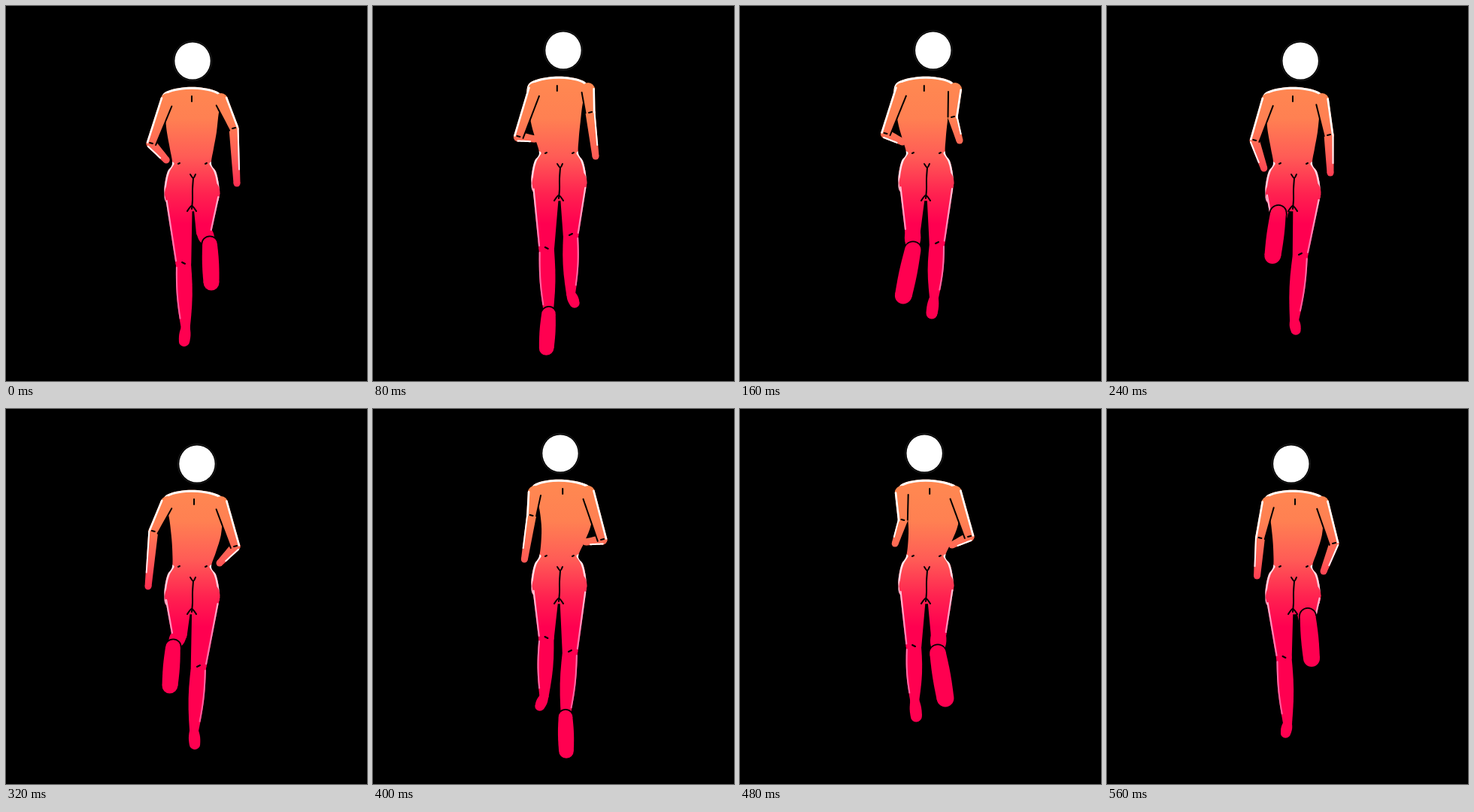
Recreate the animation shown at these times as an HTML page with a canvas. Size 480 px wide and 499 px high, loop 600 ms.

```html
<!DOCTYPE html>
<html lang="en">
<head>
<meta charset="utf-8">
<title>Run cycle</title>
<style>
  html, body { margin: 0; width: 100%; height: 100%; overflow: hidden; background: #000; }
  canvas { display: block; width: 480px; height: 499px; }
</style>
</head>
<body>
<canvas id="stage" width="480" height="499"></canvas>
<script>
const ctx = document.getElementById('stage').getContext('2d');
const STEP = 80, LOOP = 600, POSES = 8;
const CENTER = 247;

// Right-hand limbs through one stride; the left ones run half a stride later, mirrored.
const stride = [
  { elbow: [303, 163], hand: [307, 236], knee: [263, 300], ankle: [271, 317], toe: [273, 368] },
  { elbow: [289, 142], hand: [296, 200], knee: [263, 305], ankle: [263, 383], toe: [268, 395] },
  { elbow: [283, 148], hand: [292, 179], knee: [262, 316], ankle: [258, 388], toe: [255, 409] },
  { elbow: [295, 172], hand: [297, 222], knee: [257, 331], ankle: [249, 418], toe: [251, 431] },
  { elbow: [305, 183], hand: [284, 205], knee: [256, 343], ankle: [250, 428], toe: [251, 446] },
  { elbow: [305, 174], hand: [283, 177], knee: [262, 323], ankle: [256, 410], toe: [257, 455] },
  { elbow: [305, 170], hand: [282, 181], knee: [264, 300], ankle: [263, 325], toe: [273, 385] },
  { elbow: [302, 179], hand: [288, 216], knee: [266, 285], ankle: [267, 276], toe: [272, 332] }
];

// Torso half: [distance below the neckline, half width]
const torsoProfile = [
  [0, 8], [3, 26], [9, 38], [20, 40], [34, 36], [60, 33], [82, 29], [102, 26],
  [112, 32], [126, 35.5], [140, 36.5], [154, 33], [164, 10]
];

function verticalGradient(...stops) {
  const gradient = ctx.createLinearGradient(0, 0, 0, 499);
  for (const [y, color] of stops) gradient.addColorStop(y / 499, color);
  return gradient;
}
const skin = verticalGradient([100, '#ff8851'], [150, '#ff8052'], [200, '#ff5c56'], [250, '#ff2250'], [290, '#ff0050']);
const light = verticalGradient([185, '#fff'], [245, '#ffc0d4'], [310, '#ff78ae'], [470, '#ff4c92']);

const mix = (a, b, t) => a + (b - a) * t;
const range = (from, to, count) => Array.from({ length: count + 1 }, (_, i) => mix(from, to, i / count));
const wave = (turns) => Math.cos(turns * Math.PI * 2);

// Catmull-Rom spline as cubic Béziers
function spline(points, closed = false) {
  const n = points.length;
  const at = i => closed ? points[(i + n) % n] : points[Math.max(0, Math.min(n - 1, i))];
  const path = new Path2D();
  path.moveTo(...points[0]);
  for (let i = 0; i < (closed ? n : n - 1); i++) {
    const [a, b, c, d] = [at(i - 1), at(i), at(i + 1), at(i + 2)];
    path.bezierCurveTo(
      b[0] + (c[0] - a[0]) / 6, b[1] + (c[1] - a[1]) / 6,
      c[0] - (d[0] - b[0]) / 6, c[1] - (d[1] - b[1]) / 6, c[0], c[1]);
  }
  return path;
}

function stroke(path, color, width) {
  ctx.strokeStyle = color;
  ctx.lineWidth = width;
  ctx.stroke(path);
}
const ink = (...points) => stroke(spline(points), '#000', 2);

function fillSkin(path) {
  ctx.fillStyle = skin;
  ctx.fill(path);
}

// A tapered segment from a to b with round ends; its outer side is the right when it points down.
function bone(a, b, startWidth, endWidth, bulge = 0) {
  const [dx, dy] = [b[0] - a[0], b[1] - a[1]];
  const length = Math.hypot(dx, dy);
  const edge = (side, from, to, inset = 0) => range(from, to, 6).map(t => {
    const offset = side * (mix(startWidth, endWidth, t) + bulge * Math.sin(Math.PI * t) - inset) / length;
    return [a[0] + dx * t + dy * offset, a[1] + dy * t - dx * offset];
  });
  const disc = ([x, y], radius) => {
    const path = new Path2D();
    path.arc(x, y, radius, 0, Math.PI * 2);
    return path;
  };
  const body = new Path2D();
  [...edge(1, 0, 1), ...edge(-1, 1, 0)].forEach(point => body.lineTo(...point));
  body.closePath();
  const shapes = [disc(a, startWidth), body, disc(b, endWidth)];
  return {
    length,
    fill: () => shapes.forEach(fillSkin),
    outline: () => shapes.forEach(shape => stroke(shape, '#000', 3.4)),
    lightEdge: (from, to, width) => stroke(spline(edge(1, from, to, width / 2)), light, width),
    innerLine: (from, to) => stroke(spline(edge(-1, from, to)), '#000', 2)
  };
}

function drawArm({ elbow, hand }, top) {
  const upper = bone([286, top + 17], elbow, 9, 6.5);
  const fore = bone(elbow, hand, 6.5, 4.5);
  upper.fill();
  fore.fill();
  upper.lightEdge(0, 1, 2.6);
  fore.lightEdge(0, 0.75, 2);
  upper.innerLine(0.1, 1);
  ink([elbow[0] - 2, elbow[1]], [elbow[0] + 2, elbow[1] - 1]);
}

function drawLeg({ knee, ankle, toe }, top) {
  const thigh = bone([266, top + 140], knee, 18.5, 10.3);
  const shin = bone(knee, ankle, 10, 6, 2.4);
  const footLength = Math.hypot(toe[0] - ankle[0], toe[1] - ankle[1]);
  const footWidth = 6 + footLength * 0.11;
  const soleShown = footLength > 40;
  const foot = bone(ankle, toe, soleShown ? footWidth * 0.85 : 6, footWidth * 0.9, 1);

  thigh.fill();
  shin.fill();
  thigh.lightEdge(0.1, 0.95, 2.2);
  if (shin.length > 40) {
    shin.lightEdge(0.05, 0.85, 2);
    ink([knee[0] - 2, knee[1]], [knee[0] + 2, knee[1] - 2]);
  }
  if (soleShown) foot.outline();
  foot.fill();
}

function drawTorso(top, sway) {
  const side = (sign, from, to) => torsoProfile.slice(from, to).map(([down, half]) => [
    CENTER + sign * half + sway * Math.max(0, Math.sin(Math.PI * down / 100)), top + down
  ]);
  fillSkin(spline([...side(1), ...side(-1).reverse()], true));
  ctx.save();
  ctx.clip(spline([...side(1), ...side(-1).reverse()], true));
  stroke(spline([...side(-1, 0, 4).reverse(), ...side(1, 0, 4)]), light, 6);
  for (const sign of [-1, 1]) stroke(spline(side(sign, 7, 12)), light, 5);
  ctx.restore();
}

function drawDetails(top, sway) {
  const mark = top + 116, crotch = top + 162;
  ink([CENTER + sway / 2, top + 12], [CENTER + sway / 2, top + 19]);
  for (const x of [-17, 19]) ink([CENTER + x - 1, top + 102], [CENTER + x + 1, top + 101]);
  ink([CENTER - 2, mark], [CENTER + 2, mark + 5], [CENTER + 5, mark]);
  ink([CENTER + 2, mark + 5], [CENTER + 1, mark + 20], [CENTER + 1, mark + 34], [CENTER, crotch]);
  ink([CENTER - 6, crotch + 3], [CENTER, crotch - 4], [CENTER + 6, crotch + 3]);
}

function drawHead(x, y) {
  const oval = grow => {
    const path = new Path2D();
    path.ellipse(x, y, 23.7 + grow, 24.6 + grow, 0, 0, Math.PI * 2);
    return path;
  };
  stroke(oval(1.8), '#2c2c2c', 0.8);
  ctx.fillStyle = '#fff';
  ctx.fill(oval(0));
}

// The mirror leans slightly: shoulders and feet turn around different centres.
function mirrored(drawLimb) {
  ctx.save();
  ctx.transform(-1, 0, -0.038, 1, 505, 0);
  drawLimb();
  ctx.restore();
}

function draw(pose) {
  const right = stride[pose];
  const left = stride[(pose + POSES / 2) % POSES];
  const top = 101 + 7 * Math.SQRT2 * wave((pose + 0.5) / 4);
  const sway = 3 + 8 * wave((pose - 5.5) / POSES);

  ctx.fillStyle = '#000';
  ctx.fillRect(0, 0, 480, 499);
  ctx.lineCap = ctx.lineJoin = 'round';

  drawTorso(top, sway);
  drawLeg(right, top);
  mirrored(() => drawLeg(left, top));
  drawDetails(top, sway);
  drawArm(right, top);
  mirrored(() => drawArm(left, top));
  drawHead(251 - 6.5 * wave((pose - 6.6) / POSES), top - 35);
}

const began = performance.now();
function tick() {
  const time = (performance.now() - began) % LOOP;
  draw(Math.floor(time / STEP));
  requestAnimationFrame(tick);
}
tick();
</script>
</body>
</html>
```
